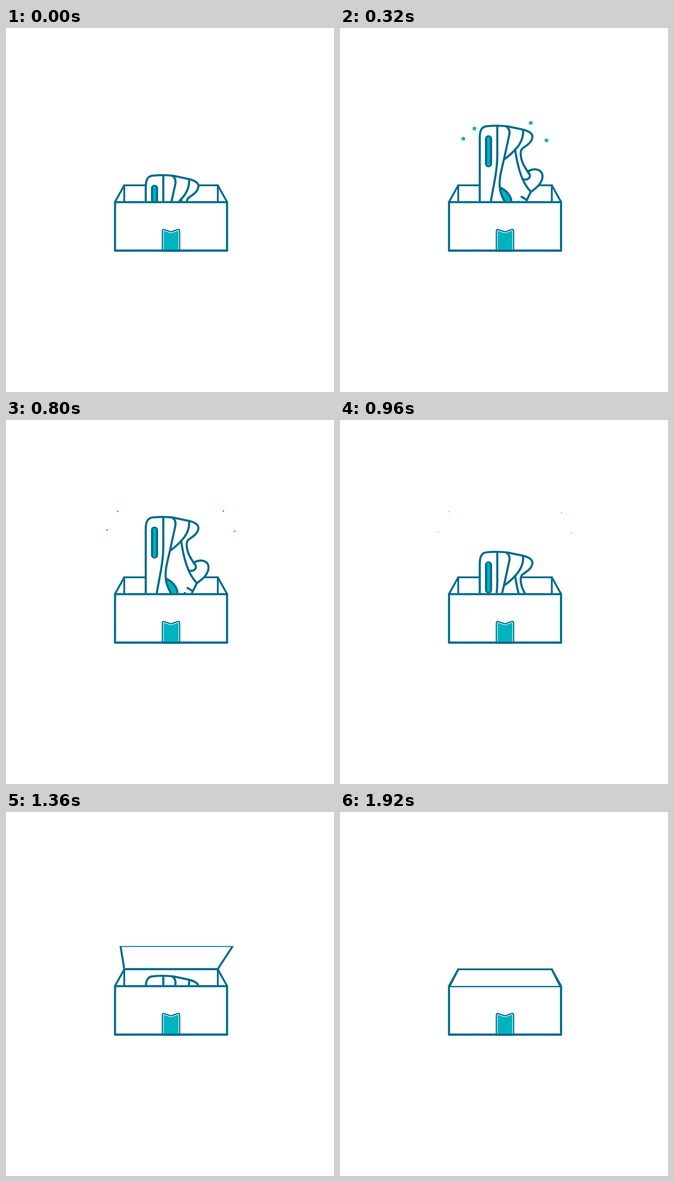
An HTML page with a canvas that plays this animation: 710x789 px, repeating every 2.2 s.

```html
<!DOCTYPE html>
<html lang="en">
<head>
<meta charset="utf-8">
<title>Shoe box</title>
<style>
html, body { margin: 0; width: 100%; height: 100%; overflow: hidden; background: #fff; }
canvas { display: block; width: 710px; height: 789px; }
</style>
</head>
<body>
<canvas id="stage" width="710" height="789"></canvas>
<script>
const ctx = document.getElementById('stage').getContext('2d');
const DARK = '#006d8c', TEAL = '#00b3be', WHITE = '#fff';
const LOOP = 2200, STEP = 40, LAST = 1920, LID_START = 1120;

const shoe = {
  body: new Path2D('M302.5 520V224C302.5 207 307 199.5 318 198.6C333 197 350 197.4 363 199L396 206' +
    'C408 209 417 214 416.5 222C415.5 234 404 240 396 246C389 251 391 262 393 271C396 283 403 291 408 300' +
    'L409 295C425 288 438 294 438.5 307C438 322 426 332 413 341L396 376L384 398V520Z'),
  tongue: new Path2D('M408 299C412 304 412 308 409 311C405 315 401 314.5 396 314'),
  heel: new Path2D('M340.5 198V262C340.5 300 330 335 324 378'),
  side: new Path2D('M360 199C367 204 368 210 366.5 217L355 270C349 296 343 315 346.5 335'),
  collar: new Path2D('M396 206C398 218 393 233 384 244C375 255 366 263 356 270'),
  vamp: new Path2D('M379 249C382 270 388 298 397 317C401 326 407 334 413 341'),
  arch: new Path2D('M346 331C362 338 371 352 371 362C371 370 369 376 366 382L340 380C350 375 357 371 357 365C356 357 347 350 346 331Z'),
  ticks: new Path2D('M393 351.5L402 357M387 362.5L396 369M379 373L388 379')
};
const tag = new Path2D('M338.3 484V441Q338.3 435 343 437L357 442L371 437Q376 435 376 441V484Z');
const tagInset = new Path2D('M340.4 481V441Q340.5 438 343 439L357 444L371 439Q374 438 374 441V481');

// Each dot: x and y at the four moments in DOT_TIMES
const DOT_TIMES = [320, 480, 800, 1120];
const DOTS = [
  [[291, 269, 242, 231], [218, 204, 198, 197]],
  [[267, 244, 219, 209], [240, 233.7, 238, 242]],
  [[413, 439.3, 470.5, 487], [205.7, 194.2, 197.3, 200]],
  [[447, 470.2, 495, 504.5], [243.5, 237.3, 241.3, 245]]
];

const clamp = v => Math.min(1, Math.max(0, v));
const smooth = v => { v = clamp(v); return v * v * (3 - 2 * v); };
const mix = (a, b, k) => a + (b - a) * k;

// Cubic through four points
function cubic(vals, t) {
  return vals.reduce((sum, v, i) => sum + DOT_TIMES.reduce(
    (p, u, j) => j === i ? p : p * (t - u) / (DOT_TIMES[i] - u), v), 0);
}

function stroke(path, width = 4.6, color = DARK) {
  ctx.lineWidth = width;
  ctx.strokeStyle = color;
  ctx.stroke(path);
}
function fill(path, color) {
  ctx.fillStyle = color;
  ctx.fill(path);
}
function line(x1, y1, x2, y2, width, color) {
  const p = new Path2D();
  p.moveTo(x1, y1);
  p.lineTo(x2, y2);
  stroke(p, width, color);
}

function drawBack() {
  line(256, 341, 458.5, 341, 4);
  line(256, 341, 256, 377, 4);
  line(458.5, 341, 458.5, 377, 4);
  line(236, 377, 256, 341, 4.2);
  line(478.5, 377, 458.5, 341, 4.2);
}

function drawDots(t) {
  if (t < 80 || t >= 1160) return;
  const r = 0.0046 * (1160 - t) + 0.15;
  ctx.fillStyle = TEAL;
  for (const [xs, ys] of DOTS) {
    ctx.beginPath();
    ctx.arc(cubic(xs, t), cubic(ys, t), r, 0, Math.PI * 2);
    ctx.fill();
  }
}

function drawShoe(t) {
  const drop = 157.5 * (t < 560 ? smooth((438 - t) / 635) : smooth((t - 724) / 437));
  ctx.save();
  ctx.beginPath();
  ctx.rect(0, 0, 710, 375.5);
  ctx.clip();
  ctx.translate(0, drop);
  fill(shoe.body, WHITE);
  fill(shoe.arch, TEAL);
  for (const p of Object.values(shoe)) stroke(p);
  line(321.5, 226, 321.5, 280, 15.5);
  line(321.5, 224.5, 321.5, 281.5, 6, TEAL);
  ctx.restore();
}

function drawFront() {
  ctx.fillStyle = WHITE;
  ctx.fillRect(236, 377.5, 242.5, 105);
  ctx.lineWidth = 4.6;
  ctx.strokeStyle = DARK;
  ctx.strokeRect(236, 377.5, 242.5, 105);
  fill(tag, TEAL);
  stroke(tagInset, 1.4, WHITE);
  stroke(tag, 2.4);
  line(236, 482.5, 478.5, 482.5, 4.6);
}

function drawLid(t) {
  if (t < LID_START) return;
  const k = 1 - Math.pow(1 - clamp((t - LID_START) / (LAST - LID_START)), 1.73);
  const y = mix(217.5, 378, k);
  const up = clamp((y - 217.5) / 74.5), down = clamp((y - 292) / 86);
  const left = mix(mix(250, 248, up), 237, down);
  const right = mix(mix(467, 490.5, up), 477, down);
  const hinge = 341 - 2.2 * clamp((341 - y) / 122);
  const thin = Math.max(2, 4.4 * Math.abs(hinge - y) / 122);

  const face = new Path2D();
  face.moveTo(256, hinge);
  face.lineTo(left, y);
  face.lineTo(right, y);
  face.lineTo(458.5, hinge);
  face.closePath();
  fill(face, WHITE);
  ctx.lineCap = 'butt';
  line(256, hinge, left, y, 4.4);
  line(458.5, hinge, right, y, 4.4);
  line(left - 2, y, right + 2, y, thin);
  line(255, hinge, 460, hinge, 3.8);
  ctx.lineCap = 'round';
}

function draw(t) {
  ctx.fillStyle = WHITE;
  ctx.fillRect(0, 0, 710, 789);
  ctx.lineCap = ctx.lineJoin = 'round';
  drawBack();
  drawDots(t);
  drawShoe(t);
  drawFront();
  drawLid(t);
}

const start = performance.now();
function tick() {
  const t = (performance.now() - start) % LOOP;
  draw(Math.min(LAST, Math.floor(t / STEP) * STEP));
  requestAnimationFrame(tick);
}
tick();
</script>
</body>
</html>
```
